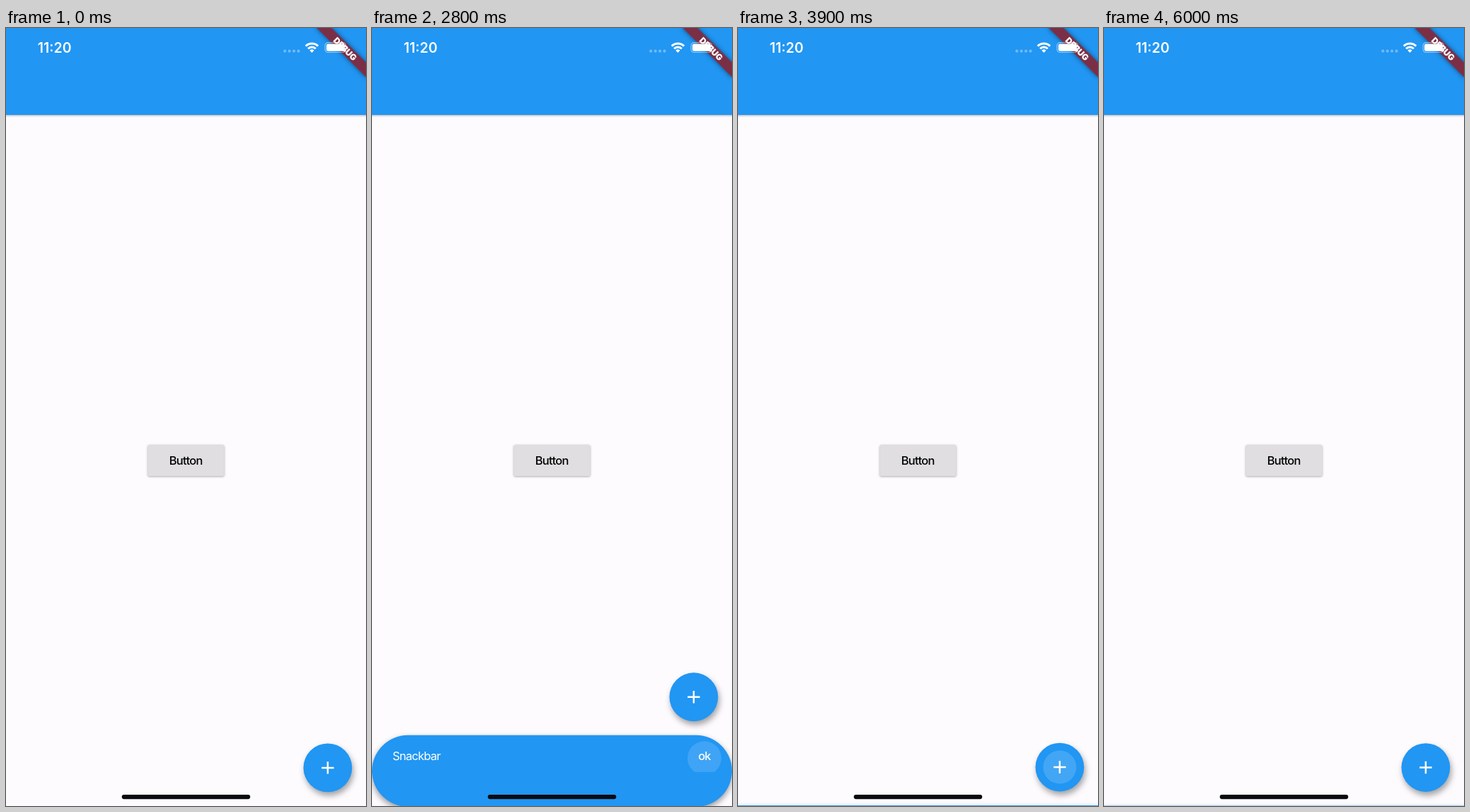
These frames come from a looping animation (509 by 1101 pixels, 6100 ms). An HTML page:

```html
<!DOCTYPE html>
<html lang="en">
<head>
<meta charset="utf-8">
<title>Snackbar demo</title>
<style>
  html, body { margin: 0; width: 100%; height: 100%; overflow: hidden; background: #fdfbfe; }
  svg { display: block; width: 509px; height: 1101px; font: 16.5px Inter, sans-serif; }
  .label { letter-spacing: -.77px; }
  .ok { font-weight: 500; text-anchor: middle; }
  .low { filter: drop-shadow(0 1.6px 1.4px rgba(0,0,0,.32)); }
  .high { filter: drop-shadow(2px 5px 4.5px rgba(0,0,0,.36)); }
  .bar { filter: drop-shadow(0 4px 4.5px rgba(0,0,0,.4)); }
</style>
</head>
<body>
<svg viewBox="0 0 509 1101">
  <defs>
    <clipPath id="buttonClip"><rect x="200.4" y="589.8" width="108.2" height="44.3" rx="2.5"/></clipPath>
    <clipPath id="okClip"><rect x="431" y="8" width="78" height="43.8" rx="2.5"/></clipPath>
    <clipPath id="fabClip"><circle r="34.4"/></clipPath>
  </defs>
  <rect width="509" height="1101" fill="#fdfbfe"/>

  <g class="label">
    <rect class="low" x="200.4" y="589.8" width="108.2" height="44.3" rx="2.5" fill="#e0dee1"/>
    <g clip-path="url(#buttonClip)"><circle id="buttonSplash" cx="254.5" cy="612"/></g>
    <text class="ok" x="254.2" y="617.7">Button</text>
  </g>

  <rect class="low" x="-9" y="-9" width="527" height="132" fill="#2196f3"/>

  <g id="snack" class="label" fill="#fff">
    <rect id="shape" class="bar" width="509" height="101" fill="#2196f3"/>
    <g clip-path="url(#okClip)"><circle id="okSplash"/></g>
    <g id="content">
      <text id="message" x="29" y="35.6"></text>
      <text class="ok" x="470" y="35.6">ok</text>
    </g>
  </g>

  <g id="fab">
    <circle class="high" r="34.4" fill="#2196f3"/>
    <g clip-path="url(#fabClip)"><circle id="fabSplash" fill="#fff"/></g>
    <path d="M-8.7 0H8.7M0-8.7V8.7" stroke="#fff" stroke-width="2.5"/>
  </g>

  <g transform="translate(509 0) rotate(45)">
    <rect x="-50" y="34.4" width="100" height="14.8" fill="#7b2f46"
      style="filter:drop-shadow(0 0 3.5px rgba(0,0,0,.5))"/>
    <text y="46.1" fill="#fff" text-anchor="middle" font-size="12" font-weight="900" letter-spacing="-.2">DEBUG</text>
  </g>

  <g fill="#fff">
    <text x="44.8" y="34.8" font-size="19.5" font-weight="600">11:20</text>
    <path d="M394.3 32.7h.01m6.4 0h.01m6.4 0h.01m6.4 0h.01" stroke="#fff" stroke-width="4.2" stroke-linecap="round" opacity=".35"/>
    <g fill="none" stroke="#fff" stroke-width="3">
      <path d="M423.8 25.6a12.4 12.4 0 0 1 17.4 0M427.1 29.2a7.7 7.7 0 0 1 10.8 0"/>
    </g>
    <path d="M429.4 31.7a4.5 4.5 0 0 1 6.2 0l-3.1 3.2z"/>
    <rect x="451.2" y="20.7" width="29.4" height="13.8" rx="4" fill="none" stroke="#fff" stroke-opacity=".5" stroke-width="1.2"/>
    <rect x="453" y="22.5" width="25.8" height="10.2" rx="2.3"/>
    <path d="M482.2 25.3q3.2 2.3 0 4.6z" opacity=".5"/>
  </g>
  <rect x="163.7" y="1085" width="181.6" height="6.2" rx="3.1" fill="#0a0b0e" id="home"/>
</svg>
<script>
const LOOP = 6100, STEP = 100, DURATION = 250, BAR = 101;
const $ = id => document.getElementById(id);
const clamp = v => Math.max(0, Math.min(1, v));

// cubic-bezier(.4, 0, .2, 1)
function ease(x) {
  if (x <= 0 || x >= 1) return clamp(x);
  let lo = 0, hi = 1, s;
  for (let i = 0; i < 24; i++) {
    s = (lo + hi) / 2;
    const bx = 1.2 * s * (1 - s) ** 2 + .6 * s * s * (1 - s) + s ** 3;
    if (bx < x) lo = s; else hi = s;
  }
  return s * s * (3 - 2 * s);
}

const snacks = [
  { show: 1185, hide: 2770, text: "Snackbar", radius: 50.5, touch: [470, 32.5, 21] },
  { show: 3885, hide: 5760, text: "Snackbar with global key", radius: 0, touch: [472, 29.5, 36] }
];

function splash(el, age, r, alpha) {
  const on = age >= 0 && age < 200;
  el.setAttribute("r", on ? r + age * .1 : 0);
  el.setAttribute("opacity", on ? alpha * (1 - age / 200) : 0);
}

function draw(t) {
  const s = snacks[t < 3500 ? 0 : 1];
  const leaving = t >= s.hide;
  const v = clamp(leaving ? 1 - (t - s.hide) / DURATION : (t - s.show) / DURATION);
  const top = 1101 - BAR * ease(v);

  $("snack").setAttribute("transform", `translate(0 ${top})`);
  $("snack").setAttribute("visibility", v > 0 ? "visible" : "hidden");
  $("shape").setAttribute("rx", s.radius);
  $("message").textContent = s.text;
  $("content").setAttribute("opacity", leaving ? 1 : ease((v - .72) / .28));
  $("fab").setAttribute("transform", `translate(454.9 ${top - 54.1})`);

  const [x, y, r] = s.touch;
  $("okSplash").setAttribute("cx", x);
  $("okSplash").setAttribute("cy", y);
  splash($("okSplash"), t - s.hide, r, .16);
  splash($("buttonSplash"), t - snacks[0].show, 30, .09);
  splash($("fabSplash"), t - snacks[1].show, 22, .16);
}

function tick() {
  draw(Math.floor(performance.now() % LOOP / STEP) * STEP);
  requestAnimationFrame(tick);
}
tick();
</script>
</body>
</html>
```
